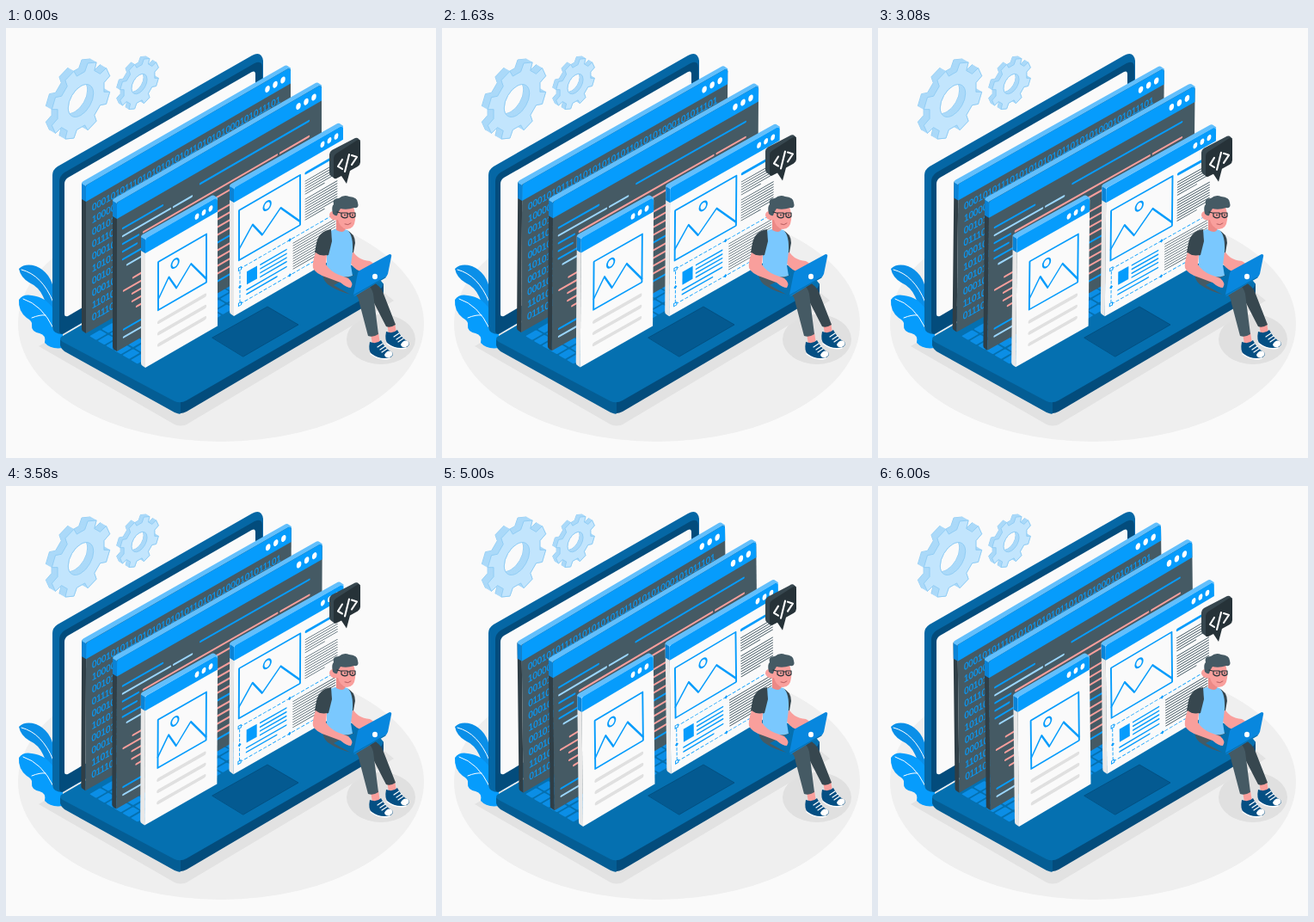
These frames come from a looping animation (500 by 500 pixels, 6.04 s). An HTML page:

```html
<!DOCTYPE html>
<html lang="en">
<head>
<meta charset="utf-8">
<style>
html, body { margin: 0; height: 100%; overflow: hidden; background: #fafafa; }
svg { display: block; width: 100vw; height: 100vh; }
text { font: 11.3px "Liberation Sans", Arial, sans-serif; fill: #069cfc; stroke: #069cfc; stroke-width: .25; }
</style>
</head>
<body>
<svg id="stage" viewBox="0 0 500 500"></svg>
<script>
const SLOPE = 0.5774;
const BLUE = '#069cfc', LIGHT = '#62bffc', MID = '#0570b0', NAVY = '#034c7c';
const SLATE = '#455a64', DARK = '#2f3e46', SKIN = '#f99f9c', PAPER = '#fafafa';

const path = (d, fill) => `<path d="${d}" fill="${fill}"/>`;
const line = (d, color, width, extra = '') =>
  `<path d="${d}" fill="none" stroke="${color}" stroke-width="${width}" stroke-linecap="round" stroke-linejoin="round" ${extra}/>`;
const ellipse = (x, y, rx, ry, fill, extra = '') =>
  `<ellipse cx="${x}" cy="${y}" rx="${rx}" ry="${ry}" fill="${fill}" ${extra}/>`;
const wall = (x, y, body) => `<g transform="matrix(1 ${-SLOPE} 0 1 ${x} ${y})">${body}</g>`;
const range = (n, f) => Array.from({ length: n }, (_, i) => f(i)).join('');

function panel(x, y, w, h, head, front, side, body) {
  const gap = head / 2 - 0.5, yr = y - w * SLOPE;
  const dots = range(3, i => ellipse(w - gap * (3 - i), head / 2 + 0.3, head * 0.145, head * 0.195, '#fff'));
  return path(`M${x} ${y}l-5 -3v${h - 2}q0 2 2 3l3 2z`, side) +
    path(`M${x} ${y + head}l-5 -3v${-head + 2}q0 -2 2 -3l4 3z`, '#0a83d6') +
    path(`M${x} ${y + 1}l-5 -3q0 -2 2 -3L${x + w - 8} ${yr - 1}q3 -2 5 0l3 2v3z`, LIGHT) +
    wall(x, y, path(`M0 0H${w - 3}q3 2 3 4V${h}H0z`, front) +
      path(`M0 ${head}V2q0 -2 2 -2H${w - 3}q3 2 3 4V${head}z`, BLUE) + dots + body);
}

function picture(x, y, w, h, sun) {
  const pts = [[0, .78], [.22, .44], [.38, .76], [.68, .43], [1, .93]]
    .map(([a, b]) => `${x + a * w} ${y + b * h}`).join('L');
  return line(`M${x} ${y}h${w}v${h}h${-w}z`, BLUE, 1.9) + line('M' + pts, BLUE, 1.9) +
    ellipse(x + w * sun, y + h * .23, 4.2, 4.8, 'none', `stroke="${BLUE}" stroke-width="1.9"`);
}

function gear(x, y, r, hole, dx, dy) {
  const step = Math.PI / 4, pts = [];
  for (let i = 0; i < 8; i++)
    for (const [a, k] of [[-.28, .79], [-.2, 1], [.2, 1], [.28, .79]]) {
      const t = (i + .5 + a) * step;
      pts.push(`${(r * k * Math.cos(t)).toFixed(1)} ${(r * k * Math.sin(t)).toFixed(1)}`);
    }
  const ring = `M${pts.join('L')}zM${hole} 0A${hole} ${hole} 0 1 0 ${-hole} 0A${hole} ${hole} 0 1 0 ${hole} 0z`;
  const layer = (k, fill, edge) =>
    `<path transform="matrix(.866 -.5 0 1 ${x + dx * k} ${y + dy * k})" d="${ring}" fill="${fill}" fill-rule="evenodd" stroke="${edge}" stroke-width=".8" stroke-linejoin="round"/>`;
  return range(9, i => layer(1 - i / 8, '#abdaf9', i ? '#abdaf9' : '#8bcaf4')) + layer(0, '#c2e5fd', '#8bcaf4');
}

function ground() {
  return ellipse(250, 344, 236, 137, '#efefef') + ellipse(436, 362, 40, 29, '#e0e0e0') +
    path('M38 370L64 355L430 300L451 317L210 461Q203 464 196 461z', '#e2e2e2');
}

function leaves() {
  return path('M15 280Q22 273 35 277Q52 284 56 306V332Q48 325 43 312Q38 301 27 296Q17 290 15 280z', '#0a8fe8') +
    line('M18 281Q42 287 55 319', '#fff', 1) +
    path('M15 316Q20 309 30 311Q47 313 55 327L66 356V372Q52 374 45 366Q47 357 39 355Q29 353 30 345Q31 341 24 337Q14 329 15 316z', BLUE) +
    line('M20 315Q42 322 55 349M30 337Q40 333 46 334', '#fff', 1);
}

function laptop() {
  const keys = range(6, r => range(14, c =>
    `<rect x="${18 + c * 14.2}" y="${15 + r * 9.6}" width="12.4" height="7.8" rx="1" fill="#0b8ee6"/>`));
  return path('M63 362V369Q64 373 68 376L196 447Q203 450 203 448V430z', '#045d94') +
    path('M203 430V448Q206 448 210 446L434 314Q439 311 439 306V297z', NAVY) +
    path('M66 358L300 222L436 294Q442 299 434 304L210 433Q203 437 196 434L66 365Q60 361 66 358z', MID) +
    `<g transform="matrix(1 ${-SLOPE} 1 ${SLOPE} 64 360)">${keys}</g>` +
    path('M240 360L304 324L340 345L276 382z', '#045a91') + line('M240 360L304 324L340 345L276 382z', NAVY, .8) +
    path('M54 348V171Q54 165 60 161L286 32Q297 26 299 38V220L66 356Q55 356 54 348z', '#0567a5') +
    path('M62 353V179Q62 172 68 168L289 41Q298 37 298 46V219L67 355Q63 357 62 353z', NAVY) +
    path('M68 333V181Q68 177 72 174L286 51Q290 49 290 54V207L72 335Q68 336 68 333z', PAPER);
}

function binary() {
  const rows = ['00010101110101010101011010101000101011101011101011', '1000010', '0010110', '0111001',
    '0001011', '1010110', '0010101', '0001011', '1101010', '0111010'];
  return `<g transform="scale(.866 1)">` + rows.map((s, i) =>
    `<text x="${7 / .866}" y="${34 + i * 14.2}">${s.slice(0, 41)}</text>`).join('') + '</g>';
}

function code() {
  const bar = ([x, y, w], color) => line(`M${x} ${y - 2}h${w}`, color, 2.3);
  const blue = [[97, 36, 126], [7, 36, 46], [7, 54, 18], [7, 63, 16], [7, 72, 22], [8, 154, 20]];
  const pale = [[7, 45, 55], [66, 45, 21], [12, 81, 16], [8, 163, 20]];
  const pink = [[190, 54, 33], [31, 54, 155], [65, 63, 120], [19, 100, 10], [8, 109, 20], [18, 118, 10], [18, 127, 10], [23, 136, 6]];
  return blue.map(b => bar(b, BLUE)).join('') + pale.map(b => bar(b, '#9bd6fd')).join('') +
    pink.map(b => bar(b, SKIN)).join('') + range(10, i => bar([100, 80 + i * 9, 34], i % 5 == 4 ? BLUE : SKIN));
}

function article() {
  const rows = (x, y, w, n, gap = 3) =>
    range(n, i => line(`M${x} ${y + i * gap}h${i == n - 1 ? w * .6 : w}`, SLATE, .9));
  const handle = (x, y) => `<rect x="${x - 1.6}" y="${y - 1.6}" width="3.2" height="3.2" fill="#fff" stroke="${BLUE}"/>`;
  const knob = (x, y) => path(`M${x - 2} ${y}l2 -2 2 2 -2 2z`, BLUE);
  return picture(6, 29.5, 71, 58, .46) + line('M84 31H112', BLUE, 3.2) +
    rows(83, 40, 37, 6) + rows(83, 61, 37, 9) + rows(69, 104, 49, 11) +
    line('M7 98H123V139H7z', BLUE, .9, 'stroke-dasharray="3 2.5"') +
    `<rect x="15" y="106" width="12" height="15" fill="${BLUE}"/>` +
    range(4, i => line(`M31 ${107 + i * 4.7}H61`, BLUE, 1.6)) + line('M15 127H61M15 132H50', BLUE, 1.6) +
    handle(7, 98) + handle(7, 139) + knob(7, 119) + knob(65, 98) + knob(65, 139);
}

const card = () => picture(15, 35.7, 56, 56, .35) + range(3, i => line(`M16 ${106 + i * 13.2}h53`, '#e0e0e0', 4.2));

function shoe(x, y) {
  return `<g transform="translate(${x} ${y})">` +
    path('M1 -8L10 -10L12 3Q7 7 3 3z', SKIN) +
    path('M0 1Q-2 11 2 15Q12 23 22 20Q29 17 26 13Q18 9 13 -1Q8 4 0 1z', '#044f83') +
    path('M17 16Q20 10 25 12Q29 16 23 19Q18 20 17 16z', '#fff') +
    line('M1 15Q12 23 23 20', '#fff', 1.5) + line('M9 7l6 -4M12 10l6 -4M14 13l6 -4', '#fff', 1.2) + '</g>';
}

function man() {
  return shoe(442, 352) + shoe(423, 364) +
    path('M405 292L425 294Q436 300 439 309L453 345Q447 349 442 347L424 312z', '#37474f') +
    path('M369 280Q366 291 374 298Q388 308 407 311Q410 313 411 320L421 358Q427 360 433 356L427 309Q424 296 404 287z', SLATE) +
    path('M402 257Q408 270 423 271Q428 273 429 278L412 283Q402 279 399 269z', SKIN) +
    path('M396 235Q406 239 406 250L404 261Q399 262 396 256z', '#37474f') +
    path('M377 236Q387 231 397 235Q404 241 403 260L401 276L403 288Q388 293 373 282V260z', '#7ac8fe') +
    path('M384 221H395V233Q393 240 384 235z', '#ec8986') +
    path('M381 209Q387 204 404 208Q407 217 406 223Q405 234 396 234Q388 232 386 223Q378 225 376 218Q376 213 381 213z', SKIN) +
    path('M380 216Q378 208 381 205Q379 198 387 198Q393 193 399 196Q409 197 409 203Q411 210 405 209Q396 212 389 210Q386 214 385 218Q383 219 380 216z', SLATE) +
    line('M385 214L389 215M390 215H397V220Q393 222 390 219zM400 215H406V219Q403 222 400 219zM397 216H400', '#263238', 1.2) +
    ellipse(394, 217.5, .8, 1, '#263238') + ellipse(403, 217.5, .8, 1, '#263238') +
    line('M394 228Q398 230 401 227', '#a54c50', .8) +
    path('M378 234Q364 236 361 250L359 261Q366 267 375 264L379 248z', '#37474f') +
    path('M381 299L405 287L423 297L404 312z', '#0570b0') +
    path('M360 261Q356 273 357 279Q360 286 373 290L389 296Q396 302 401 302Q405 297 398 291L387 287Q377 283 372 275L373 264Q366 266 360 261z', SKIN) +
    path('M404 310L409 285Q410 282 413 281L446 263Q449 263 448 266L444 286Q443 289 440 291L407 311Q404 313 404 310z', '#0887de') +
    line('M404 311L441 290', '#0672b4', 1.3) + ellipse(429, 289, 3, 3.2, '#fff');
}

const bubble = () =>
  path('M376 147Q376 144 379 142L404 129Q407 127 409 128L412 131L382 150V175L378 172Q376 171 376 168z', '#37474f') +
  path('M381 151Q381 148 384 146L409 130Q412 129 412 133V156Q412 159 409 161L400 166L396 181L390 172L384 175Q381 176 381 172z', '#263238') +
  line('M391 153L386 161L391 164M399 147L394 167M402 148L408 150L402 159', '#fff', 2.1);

document.getElementById('stage').innerHTML =
  ground() + leaves() + laptop() + gear(87, 84.5, 40, 17, -7, -4) + gear(155, 65, 26.5, 10.5, -4, -2.5) +
  '<g id="panels">' +
  panel(93, 183, 238, 172, 19, SLATE, DARK, binary()) +
  panel(129, 203, 238, 173, 19, SLATE, DARK, code()) +
  panel(265, 186, 127, 149, 17, PAPER, '#e8e8e8', article()) +
  panel(162, 245, 84, 150, 17, PAPER, '#e8e8e8', card()) +
  '</g>' + `<g id="bubble">${bubble()}</g>` + man();

const panels = document.getElementById('panels');
const tag = document.getElementById('bubble');

function draw() {
  const t = performance.now() % 6040;
  // Sway starts after one second; the sign floats in a linear zigzag.
  const p = Math.max(0, t - 1000) / 1500;
  const angle = p < 1 ? p : p < 3 ? 2 - p : p - 4;
  const lift = 20 * (1 - Math.abs(t % 1500 / 750 - 1));
  panels.setAttribute('transform', `rotate(${angle} 239 219)`);
  tag.setAttribute('transform', `translate(0 ${-lift})`);
  requestAnimationFrame(draw);
}
draw();
</script>
</body>
</html>
```
